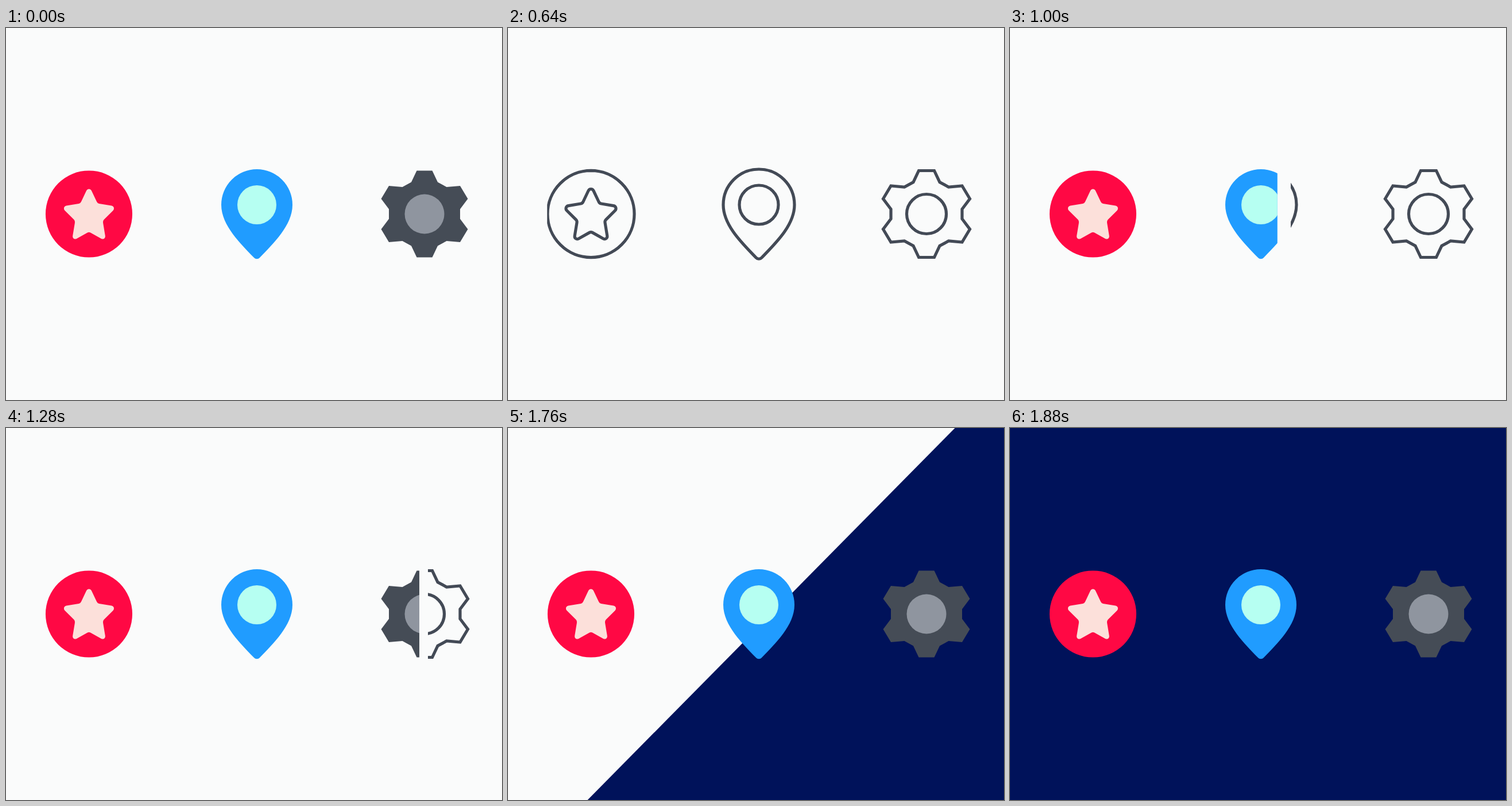
Write an HTML page that moves like this. It is 864 by 648 pixels and loops after 3000 ms.

```html
<!DOCTYPE html>
<html lang="en">
<head>
<meta charset="utf-8">
<title>Icon fill</title>
<style>
  html, body { margin: 0; width: 100%; height: 100%; overflow: hidden; background: #fafbfb; }
  svg { display: block; width: 100vw; height: 100vh; }
  .line { fill: none; stroke: #434a56; stroke-width: 5.2; stroke-miterlimit: 8; }
</style>
</head>
<body>
<svg id="stage" viewBox="0 0 864 648" xmlns="http://www.w3.org/2000/svg">
  <rect width="864" height="648" fill="#fafbfb"/>
  <g id="night">
    <path id="sweep" fill="#00125a"/>
  </g>
</svg>
<script>
const LOOP = 3000, DRAW_FROM = 40, DRAW_END = 440;
const svg = document.getElementById('stage');
const sweep = document.getElementById('sweep');

function add(parent, tag, attrs) {
  const el = document.createElementNS('http://www.w3.org/2000/svg', tag);
  for (const key in attrs) el.setAttribute(key, attrs[key]);
  parent.appendChild(el);
  return el;
}

const clamp = x => Math.min(1, Math.max(0, x));
const smooth = x => { x = clamp(x); return x * x * (3 - 2 * x); };

// Clockwise circle starting at the top
const circle = (x, y, r) =>
  `M${x} ${y - r}a${r} ${r} 0 0 1 0 ${2 * r}a${r} ${r} 0 0 1 0 ${-2 * r}Z`;

// Mirrors one quadrant of the gear outline into a full ring
function gear(cx, cy) {
  const q = [[13.5, -75.5], [23, -55.5], [38.5, -47], [62, -49], [75.5, -26.5], [62, -8.5]];
  const flip = (pts, sx, sy) => pts.map(([x, y]) => [x * sx, y * sy]).reverse();
  const right = [...q, ...flip(q, 1, -1)];
  const ring = [...right, ...flip(right, -1, 1)];
  return 'M' + ring.map(([x, y]) => `${cx + x} ${cy + y}`).join('L') + 'Z';
}

const star = `M144.5 280.5C146.3 280.5 148 281.5 149 283.5L158 302.5Q159.3 305.5 162.3 306
  L183.8 309.6C188 310.3 189.4 315 186.5 318L170.6 333.8Q168.5 336 169 339
  L172.8 362C173.4 366.2 169.7 368.8 166 367L147.2 356.4Q144.5 355 141.8 356.4
  L123 367C119.3 368.8 115.6 366.2 116.2 362L120 339Q120.5 336 118.4 333.8
  L102.5 318C99.6 315 101 310.3 105.2 309.6L126.7 306Q129.7 305.5 131 302.5
  L140 283.5C141 281.5 142.7 280.5 144.5 280.5Z`;

const pin = `M437 246A62 62 0 0 1 499 308C499 344 465 376 442 400
  C439.2 403 434.8 403 432 400C409 376 375 344 375 308A62 62 0 0 1 437 246Z`;

const icons = [
  { cx: 144.5, start: 625, dur: 230,
    shapes: [[circle(144.5, 324, 75.6), '#ff0844'], [star, '#fce0da']] },
  { cx: 437, start: 845, dur: 250,
    shapes: [[pin, '#209cff'], [circle(437, 308, 34), '#b6fff2']] },
  { cx: 729, start: 1160, dur: 262,
    shapes: [[gear(729, 324), '#454c56'], [circle(729, 324, 34.5), '#8f959f']] }
];

const defs = add(svg, 'defs', {});

function clipped(id) {
  const clip = add(defs, 'clipPath', { id });
  const rect = add(clip, 'rect', { y: 230, height: 190 });
  return { rect, group: add(svg, 'g', { 'clip-path': `url(#${id})` }) };
}

icons.forEach((icon, i) => {
  icon.line = clipped('line' + i);
  icon.fill = clipped('fill' + i);
  icon.strokes = icon.shapes.map(([d, color]) => {
    add(icon.fill.group, 'path', { d, fill: color });
    return add(icon.line.group, 'path', { d, class: 'line', pathLength: 1 });
  });
});

function span(rect, from, to) {
  rect.setAttribute('x', from);
  rect.setAttribute('width', Math.max(0, to - from));
}

function render(t) {
  const intro = t < DRAW_FROM;
  const drawn = smooth(t / DRAW_END);
  for (const { cx, start, dur, line, fill, strokes } of icons) {
    // The outline retreats a little faster than the colour advances
    const e = intro ? 1 : smooth((t - start) / dur);
    const left = cx - 79;
    span(fill.rect, left - 5, e === 0 ? left - 5 : left + 158 * e);
    span(line.rect, e === 0 ? left - 5 : left + 192 * e, intro ? 0 : left + 170);
    for (const s of strokes) {
      if (drawn < 1) s.setAttribute('stroke-dasharray', `${drawn} 2`);
      else s.removeAttribute('stroke-dasharray');
    }
  }
  // Diagonal edge crossing from the bottom right corner
  const top = 1314 - 6.61 * (t - 1680);
  sweep.setAttribute('d', t < 1660 ? '' :
    `M${top} 0L${top - 640} 648H2400V0Z`);
}

const began = performance.now();
function tick() {
  render((performance.now() - began) % LOOP);
  requestAnimationFrame(tick);
}
render(0);
requestAnimationFrame(tick);
</script>
</body>
</html>
```
